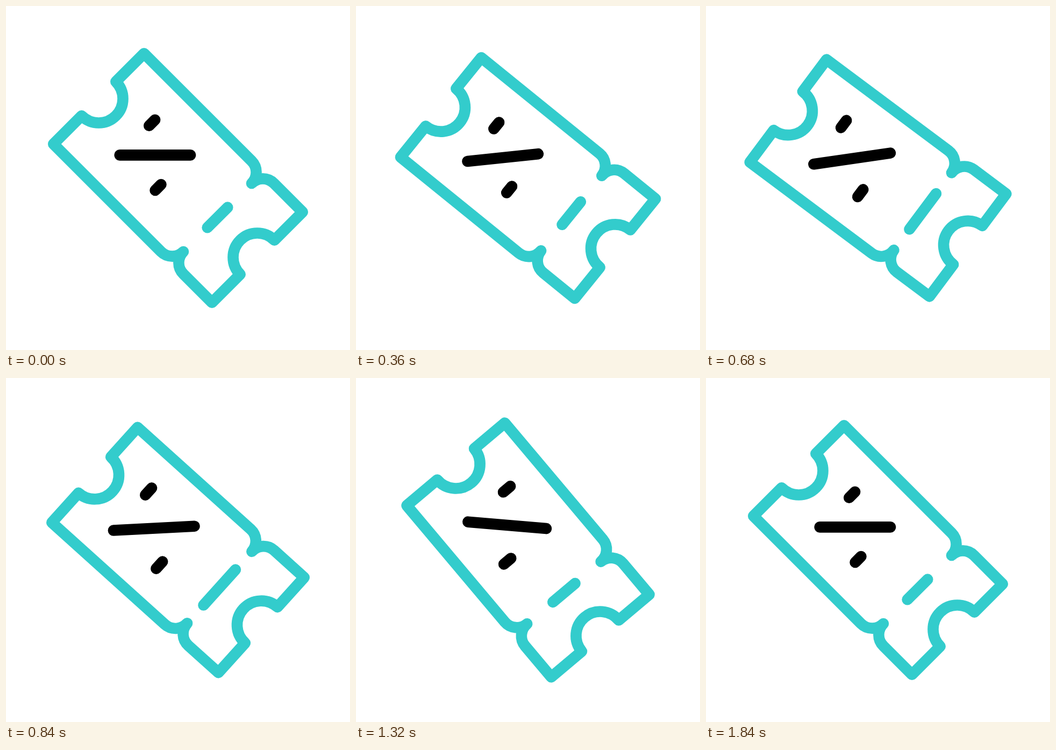
Write an HTML page with a canvas that moves like this. It is 640 by 640 pixels and loops after 1920 ms.

```html
<!DOCTYPE html>
<html lang="en">
<head>
<meta charset="utf-8">
<title>Discount ticket</title>
<style>
  html, body { margin: 0; width: 100%; height: 100%; overflow: hidden; background: #fff; }
  canvas { display: block; width: 640px; height: 640px; }
</style>
</head>
<body>
<canvas id="stage" width="640" height="640"></canvas>
<script>
const ctx = document.getElementById('stage').getContext('2d');
const LOOP = 1920, STEP = 40;
const TEAL = '#33cccc', BLACK = '#000';
const W = 208.6, H = 119.2;          // half size of the ticket
const BITE = 45, NOTCH = 29.4, FOLD = 103.9;

// keys are [time, value] pairs, eased in and out
const TILT = [[80, 0], [565, -9.7], [1165, 5.65], [1840, 0]];
const ZOOM = [[280, 1], [1050, 1.18], [1080, 1.18], [1650, 1]];
const DASH = [[298, 26.6], [820, 44.5], [1370, 26.6]];

function ease(keys, t) {
  if (t <= keys[0][0]) return keys[0][1];
  for (let i = 1; i < keys.length; i++) {
    const [t0, a] = keys[i - 1], [t1, b] = keys[i];
    if (t < t1) {
      const p = (t - t0) / (t1 - t0);
      return a + (b - a) * p * p * (3 - 2 * p);
    }
  }
  return keys[keys.length - 1][1];
}

function line(x1, y1, x2, y2) {
  ctx.beginPath();
  ctx.moveTo(x1, y1);
  ctx.lineTo(x2, y2);
  ctx.stroke();
}

function outline() {
  const q = Math.PI / 2, y = H - NOTCH;
  ctx.beginPath();
  ctx.moveTo(-W, -H);
  ctx.arc(FOLD - NOTCH, -y, NOTCH, -q, 0);
  ctx.arc(FOLD + NOTCH, -y, NOTCH, 2 * q, 3 * q);
  ctx.lineTo(W, -H);
  ctx.arc(W, 0, BITE, -q, q, true);
  ctx.lineTo(W, H);
  ctx.arc(FOLD + NOTCH, y, NOTCH, q, 2 * q);
  ctx.arc(FOLD - NOTCH, y, NOTCH, 0, q);
  ctx.lineTo(-W, H);
  ctx.arc(-W, 0, BITE, q, -q, true);
  ctx.closePath();
  ctx.stroke();
}

function percent(s) {
  const cx = -60.3, r = 46.5 * s, v = 38.5 * s, d = 7.7 * s;
  line(cx - r, r, cx + r, -r);
  for (const k of [-1, 1]) line(cx + k * r, k * v - d, cx + k * r, k * v + d);
}

function draw(t) {
  ctx.setTransform(1, 0, 0, 1, 0, 0);
  ctx.fillStyle = '#fff';
  ctx.fillRect(0, 0, 640, 640);
  ctx.translate(320, 320);
  ctx.rotate((45 + ease(TILT, t)) * Math.PI / 180);
  ctx.lineWidth = 20.6;
  ctx.lineCap = ctx.lineJoin = 'round';
  ctx.strokeStyle = TEAL;
  outline();
  const half = ease(DASH, t);
  line(FOLD, -half, FOLD, half);
  ctx.strokeStyle = BLACK;
  percent(ease(ZOOM, t));
}

const start = performance.now();
function tick() {
  const t = (performance.now() - start) % LOOP;
  draw(Math.floor(t / STEP) * STEP);
  requestAnimationFrame(tick);
}
tick();
</script>
</body>
</html>
```
